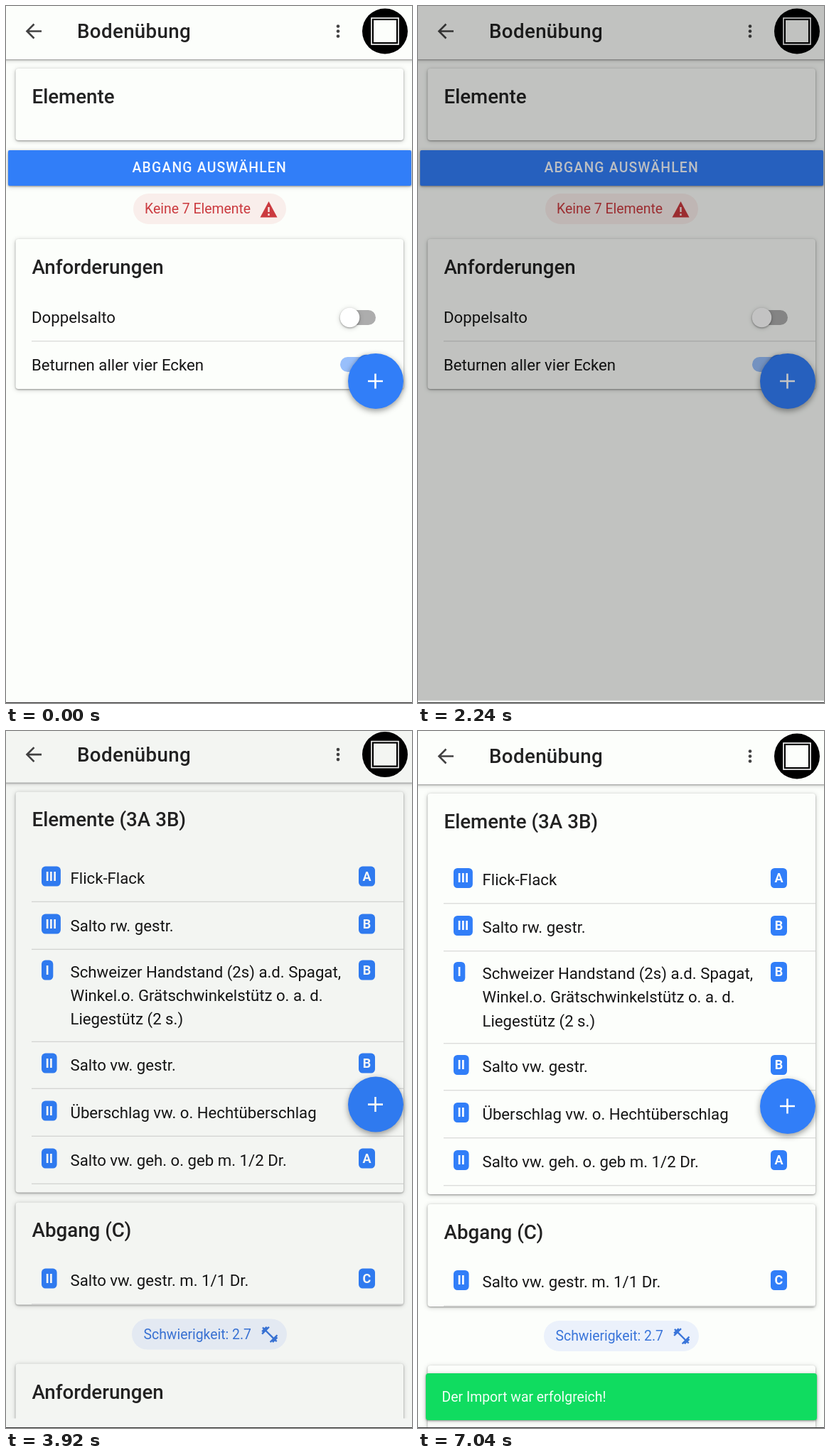
Write an HTML page that moves like this. It is 571 px wide and 981 px high and loops after 7.08 s.

```html
<!DOCTYPE html>
<html lang="de">
<head>
<meta charset="utf-8">
<title>Bodenübung</title>
<style>
html, body { margin: 0; width: 100%; height: 100%; overflow: hidden; background: #000; }
svg { display: block; width: 100%; height: 100%; }
text { font-family: Roboto, "Liberation Sans", sans-serif; font-size: 22.2px; fill: #151515; white-space: pre; }
.title { font-size: 27.7px; font-weight: 500; fill: #222; }
.small { font-size: 19.4px; }
.badge { font-size: 18px; font-weight: 700; fill: #fff; text-anchor: middle; }
.caps { font-size: 19.4px; font-weight: 500; letter-spacing: .06em; fill: #f4f8ff; }
.pdf { font-weight: 900; fill: #fff; text-anchor: middle; }
.raised { filter: drop-shadow(0 1px 1px #0005) drop-shadow(0 1px 3px #0003); }
.fab { filter: drop-shadow(0 3px 4px #0006); }
</style>
</head>
<body>
<svg id="stage" viewBox="0 0 571 981" preserveAspectRatio="none"></svg>
<script>
const PAGE = '#fcfefb', BLUE = '#317ef8', W = 571, H = 981;
const SHEET = 210;

const rect = (x, y, w, h, fill, r = 0, extra = '') =>
  `<rect x="${x}" y="${y}" width="${w}" height="${h}" rx="${r}" fill="${fill}" ${extra}/>`;
const circle = (x, y, r, fill, extra = '') => `<circle cx="${x}" cy="${y}" r="${r}" fill="${fill}" ${extra}/>`;
const text = (x, y, s, cls = '', extra = '') => `<text x="${x}" y="${y}" class="${cls}" ${extra}>${s}</text>`;
const stroke = (d, color, width) => `<path d="${d}" fill="none" stroke="${color}" stroke-width="${width}"/>`;
const card = (y, h) => rect(13.5, y, 545.5, h, PAGE, 4, 'class="raised"');
const divider = y => rect(36, y, 523, 1.4, '#dcdddb');
const dots = (x, ys, r, fill) => ys.map(y => circle(x, y, r, fill)).join('');
const group = (id, body, extra = '') => `<g id="${id}" ${extra}>${body}</g>`;

function badge(x, y, w, s) {
  return rect(x, y, w, 28, BLUE, 5.5) + text(x + w / 2, y + 20, s, 'badge');
}

// One list entry: element group on the left, difficulty on the right.
function row(y, kind, lines, level, lineY) {
  return badge(50, y, 11 + 5.3 * kind.length, kind) + badge(496, y, 23, level) +
    lines.map((s, i) => text(90.5, y + 24 + i * 33.3, s)).join('') + divider(lineY);
}

function toggle(y, on) {
  return rect(470, y - 10.5, 50, 21, on ? '#98bffb' : '#adadad', 10.5) +
    circle(on ? 507 : 483.5, y, 13.8, on ? BLUE : '#fff', 'class="raised"');
}

const emptyPage =
  card(88, 101) + text(36.5, 136.5, 'Elemente', 'title') +
  rect(3, 203, 567, 50, BLUE, 2, 'class="raised"') + text(177.5, 234, 'ABGANG AUSWÄHLEN', 'caps') +
  rect(179, 264, 215, 43, '#f9eeeb', 21.5) +
  text(195, 292, 'Keine 7 Elemente', 'small', 'style="fill:#cb3a3f"') +
  '<path d="M369.5 275L381.5 297.5H357.5Z" fill="#cb3a3f"/>' +
  stroke('M369.5 283V290M369.5 292.3V295', '#f9eeeb', 2.3) +
  card(328, 211) + text(36.5, 376.5, 'Anforderungen', 'title') +
  text(36, 446, 'Doppelsalto') + toggle(438.5, false) + divider(471) +
  text(36, 512.5, 'Beturnen aller vier Ecken') + toggle(504.5, true);

const filledPage =
  card(88, 564) + text(36.5, 136.5, 'Elemente (3A 3B)', 'title') +
  row(193, 'III', ['Flick-Flack'], 'A', 242) +
  row(260, 'III', ['Salto rw. gestr.'], 'B', 309) +
  row(325, 'I', ['Schweizer Handstand (2s) a.d. Spagat,', 'Winkel.o. Grätschwinkelstütz o. a. d.', 'Liegestütz (2 s.)'], 'B', 439) +
  row(456, 'II', ['Salto vw. gestr.'], 'B', 505) +
  row(523, 'II', ['Überschlag vw. o. Hechtüberschlag'], 'A', 572) +
  row(590, 'II', ['Salto vw. geh. o. geb m. 1/2 Dr.'], 'A', 639) +
  card(666, 144) + text(36.5, 714.5, 'Abgang (C)', 'title') +
  row(759, 'II', ['Salto vw. gestr. m. 1/1 Dr.'], 'C', 808.5) +
  rect(177, 830, 218, 43, '#ebf1fb', 21.5) +
  text(193.5, 858, 'Schwierigkeit: 2.7', 'small', 'style="fill:#3a75da"') +
  '<path transform="translate(357 838) scale(1.15)" fill="#3a75da" d="M20.57 14.86L22 13.43 20.57 12 17 15.57 8.43 7 12 3.43 10.57 2 9.14 3.43 7.71 2 5.57 4.14 4.14 2.71 2.71 4.14l1.43 1.43L2 7.71l1.43 1.43L2 10.57 3.43 12 7 8.43 15.57 17 12 20.57 13.43 22l1.43-1.43L16.29 22l2.14-2.14 1.43 1.43 1.43-1.43-1.43-1.43L22 16.29z"/>' +
  card(893, 140) + text(36.5, 942, 'Anforderungen', 'title');

const header =
  rect(-5, -10, 581, 85, PAGE, 0, 'class="raised"') +
  stroke('M50 35.5H30M39.5 25.5L29.5 35.5L39.5 45.5', '#424242', 2.6) +
  text(100, 45, 'Bodenübung', 'title', 'style="letter-spacing:.0125em"') +
  group('press', rect(442, 13, 49, 45, '#0000001f', 3)) +
  dots(467, [28.5, 35.5, 42.5], 2.3, '#424242') +
  circle(533, 35.5, 32, '#000') +
  rect(514, 17, 38, 37, 'none', 0, 'stroke="#fff" stroke-width="1.6"') + rect(517, 20, 32, 31, PAGE);

const fab = circle(520, 528, 39, BLUE, 'class="fab"') + stroke('M509 528H530M519.5 517.5V538.5', '#fff', 2.6);

const toast = rect(11, 904, 550, 66, '#10dc60', 4, 'class="raised"') +
  text(33.5, 943.5, 'Der Import war erfolgreich!', 'small', 'style="fill:#f2fff6"');

const pdfIcon = (x, y, size, font) => rect(x, y, size, size, '#db4238', size / 10) +
  text(x + size / 2 + .5, y + size / 2 + font * .36, 'PDF', 'pdf', `style="font-size:${font}px;letter-spacing:.04em"`);

const listIcon = [25.5, 32.6, 39.7].map(y => rect(471, y, 5.6, 5.6, '#fff') + rect(478, y, 17, 5.6, '#fff')).join('');

const picker =
  rect(0, 0, W, H, '#f3f5f3') +
  rect(0, 74, W, 83, '#eff0ee') + rect(0, 156.5, W, 1.5, '#d8dad8') +
  rect(-5, -10, 581, 84, '#0170c9', 0, 'class="raised"') +
  stroke('M26 28.8H51M26 35.8H51M26 42.8H51', '#fff', 2.6) +
  text(100, 46, 'Downloads', 'title', 'style="fill:#fff"') +
  circle(412, 31.5, 7.3, 'none', 'stroke="#fff" stroke-width="2.8"') + stroke('M417 36.5L426.5 46', '#fff', 3.6) +
  listIcon + dots(541, [27.5, 35.8, 44], 2.8, '#fff') +
  text(362, 126, 'Geändert', '', 'style="font-size:24.95px;font-weight:500;fill:#222"') +
  stroke('M510.5 110.5L521.5 121.8L532.5 110.5', '#111', 4) +
  rect(22, 180.5, 255, 331, PAGE, 1, 'class="raised"') +
  pdfIcon(128, 287, 42, 17.5) + pdfIcon(47.5, 460.5, 24.5, 10.2) +
  text(92, 471, 'Boden.pdf', '', 'style="fill:#444"') +
  ['50,58 KB', '19:07'].map((s, i) => text(92 + i * 73.5, 495, s, '', 'style="font-size:16.6px;fill:#555"')).join('');

const sheet = rect(0, 0, W, SHEET + 2, PAGE) + text(22, 49, 'Funktionen', '', 'style="fill:#8b8b8b"');

const stage = document.getElementById('stage');
stage.innerHTML =
  `<clipPath id="reveal"><rect id="window" width="${W}" height="${H}"/></clipPath>` +
  group('app', rect(0, 0, W, H, PAGE) + group('empty', emptyPage) + group('filled', filledPage) + header + fab +
    group('toast', toast)) +
  rect(0, 0, W, H, '#000', 0, 'id="shade"') +
  group('sheet', sheet) +
  group('cover', group('picker', picker), 'clip-path="url(#reveal)"') +
  rect(0, 980, W, 1, '#333');

const el = id => document.getElementById(id);
const ramp = (t, start, length) => Math.min(1, Math.max(0, (t - start) / length));
const easeOut = (x, n) => 1 - (1 - x) ** n;
const show = (id, on) => el(id).style.display = on ? '' : 'none';
const move = (id, y) => el(id).setAttribute('transform', `translate(0 ${y})`);

function draw(t) {
  const opening = ramp(t, 2460, 425), closing = ramp(t, 3660, 425);
  const away = easeOut(opening, 2.2) - easeOut(closing, 2.2);
  const covered = easeOut(opening, 4.5) - easeOut(closing, 4.5);
  const dim = .315 * (ramp(t, 800, 180) - ramp(t, 2190, 200));
  const raised = easeOut(ramp(t, 940, 400), 3) - ramp(t, 2180, 62);

  show('empty', t < 3400);
  show('filled', t >= 3400);
  el('press').style.opacity = ramp(t, 760, 100) - ramp(t, 1480, 220);
  el('toast').style.opacity = ramp(t, 4020, 380);
  move('app', -.02 * H * away);
  el('shade').style.opacity = dim + .3 * away;

  show('sheet', raised > 0);
  move('sheet', H - SHEET * raised);

  show('cover', covered > 0);
  el('window').setAttribute('y', H * (1 - covered));
  move('picker', .041 * H * (1 - covered));
}

const begin = performance.now();
function tick() {
  draw((performance.now() - begin) % 7080);
  requestAnimationFrame(tick);
}
tick();
</script>
</body>
</html>
```
